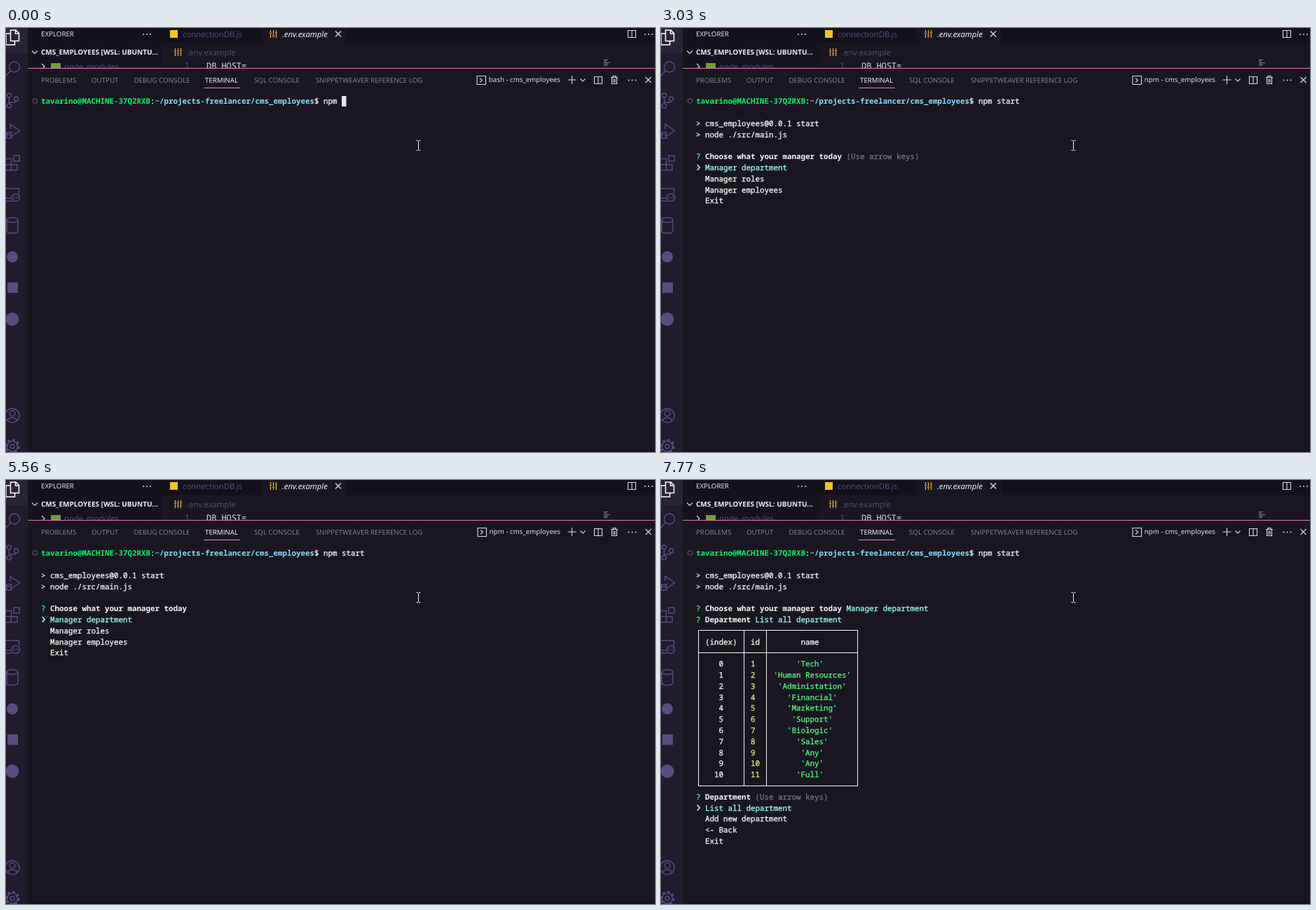
Write an HTML page that moves like this. It is 926 by 605 pixels and loops after 8 s.

```html
<!DOCTYPE html>
<html lang="en">
<head>
<meta charset="utf-8">
<title>Terminal session</title>
<style>
  html, body { margin: 0; width: 100%; height: 100%; overflow: hidden; background: #191622; }
  svg { display: block; width: 926px; height: 605px; }
  text { white-space: pre; text-rendering: geometricPrecision; }
  .ui { font-family: "Open Sans", "Noto Sans", sans-serif; font-size: 9.75px; fill: #efedf5; }
  .file { font-size: 11.35px; }
  .folder { font-size: 10px; font-weight: 700; }
  .mono { font-family: "Noto Sans Mono", "DejaVu Sans Mono", monospace; font-size: 10.833px; }
  .code { font-size: 11.9px; }
  .dim { fill: #5a4b81; }
  .tab { fill: #8a8594; }
  .line { fill: none; stroke: #5a4b81; stroke-width: 1.5; }
  .tool { fill: none; stroke: #dedbe6; stroke-width: 1.1; }
  .gold { fill: none; stroke: #f0b429; stroke-width: 1.3; }
</style>
</head>
<body>
<svg viewBox="0 0 926 605">
  <defs>
    <path id="sliders" d="M1.5 0V3M1.5 6V11M5.5 0V6M5.5 9V11M9.5 0V2M9.5 5V11M0 4.5H3M4 7.5H7M8 3.5H11"/>
    <path id="split" d="M.5 .5H11.5V10.5H.5ZM6 .5V10.5"/>
    <g id="dots" fill="#dedbe6"><circle cx="1" r="1"/><circle cx="6" r="1"/><circle cx="11" r="1"/></g>
    <path id="cross" d="M0 0L8 8M8 0L0 8"/>
  </defs>

  <!-- Explorer and editor -->
  <rect width="926" height="605" fill="#191622"/>
  <rect x="31" width="192" height="57" fill="#15121e"/>
  <rect x="223" width="703" height="21" fill="#13111b"/>
  <rect x="365" width="121" height="21" fill="#191622"/>
  <g class="ui">
    <text x="50" y="12">EXPLORER</text>
    <text x="50" y="38" class="folder">CMS_EMPLOYEES [WSL: UBUNTU...</text>
    <g class="file">
      <text x="83" y="59" class="dim">node_modules</text>
      <text x="252" y="12.7" class="dim">connectionDB.js</text>
      <text x="394" y="12.7" font-style="italic" fill="#fff">.env.example</text>
      <text x="258" y="39" class="dim">.env.example</text>
    </g>
  </g>
  <g class="mono code">
    <text x="255" y="58" class="dim">1</text>
    <text x="286" y="58" fill="#e1e1e6">DB_HOST=</text>
  </g>
  <rect x="234" y="3" width="11" height="11" fill="#f5c322"/>
  <rect x="64" y="50" width="14" height="9" rx="1" fill="#6ba03c"/>
  <use href="#sliders" x="376" y="3" class="gold"/>
  <use href="#sliders" x="240" y="29" class="gold"/>
  <use href="#dots" x="195" y="9"/>
  <use href="#dots" x="911" y="9"/>
  <g class="tool">
    <path d="M37 32.5L41 36.5L45 32.5M51 51L55 55L51 59"/>
    <use href="#split" x="887" y="3"/>
    <use href="#cross" x="470" y="4.5" stroke-width="1.3"/>
  </g>
  <path d="M853 45.5H859M853 47.5H857M853 49.5H862M853 51.5H859M853 53.5H858" stroke="#85818f" fill="none"/>

  <!-- Panel -->
  <rect x="31" y="57" width="895" height="548" fill="#191622"/>
  <rect x="31" y="57" width="895" height="1" fill="#f075be"/>
  <rect x="31" y="603" width="895" height="2" fill="#13111b"/>
  <rect x="282" y="85" width="52" height="1" fill="#ff79c6"/>
  <g class="ui">
    <g class="tab">
      <text x="50" y="78">PROBLEMS</text>
      <text x="122" y="78">OUTPUT</text>
      <text x="182.5" y="78">DEBUG CONSOLE</text>
      <text x="354" y="78">SQL CONSOLE</text>
      <text x="442" y="78">SNIPPETWEAVER REFERENCE LOG</text>
    </g>
    <text x="284" y="78" fill="#fff">TERMINAL</text>
    <text id="shell" x="791" y="77.4" text-anchor="end"></text>
  </g>
  <g class="tool">
    <path id="shellIcon" d="M672 68.5H684.5V80.5H672ZM676 71.5L679.5 74.5L676 77.5"/>
    <path d="M801.5 74H813.5M807.5 68V80M819.5 72.5L823 76L826.5 72.5"/>
    <use href="#split" x="839" y="69"/>
    <path d="M863 70.5H873M866 70V68.5H870V70M864.5 71V79.5H871.5V71M867 72.5V78M869 72.5V78"/>
    <use href="#cross" x="912.5" y="70"/>
  </g>
  <use href="#dots" x="887.5" y="74.5"/>
  <circle cx="41.5" cy="104" r="3.2" fill="none" stroke="#55515e" stroke-width="1.3"/>

  <!-- Activity bar -->
  <rect width="31" height="605" fill="#201b2d"/>
  <rect width="31" height="36" fill="#292338"/>
  <path d="M6.5 3H14L18.5 7.5V18.5H6.5ZM13.5 3V8H18.5M6.5 8H0V24H12.5V18.5" fill="none" stroke="#fff" stroke-width="1.5"/>
  <g class="line">
    <circle cx="12" cy="55.5" r="7.5"/><path d="M6.5 61L-1 69"/>
    <circle cx="4.5" cy="96" r="3"/><circle cx="14.5" cy="101" r="3"/><circle cx="4.5" cy="111" r="3"/>
    <path d="M4.5 99V108M14.5 104C14.5 107 10 106 4.5 106"/>
    <path d="M6 144V137.5L19.5 146.5L9.5 153.5"/>
    <ellipse cx="4" cy="153" rx="3.5" ry="4.5"/>
    <path d="M.5 152H7.5M-1 149L1 150M7 150L9 148M7.5 154H10M7 156L9 158M1 156L-1 158"/>
    <path d="M0 186.5H7.5V203H0M0 195H16V203H7.5M11 182H19V190H11Z"/>
    <path d="M0 229H18.5V236M0 243H9M0 247H9"/><circle cx="14" cy="242" r="5.5"/>
    <path d="M11 240L13 242L11 244M17 240L15 242L17 244" stroke-width="1"/>
    <ellipse cx="9" cy="274" rx="8" ry="3.5"/><path d="M1 274V289C1 294 17 294 17 289V274"/>
    <circle cx="9" cy="553" r="10"/><circle cx="9" cy="550" r="4"/><path d="M2.5 560C4 554.5 14 554.5 15.5 560"/>
    <circle cx="9" cy="597" r="3"/><circle cx="9" cy="597" r="7.5"/>
    <circle cx="9" cy="597" r="9.3" stroke-width="2.5" stroke-dasharray="3.5 3.8"/>
  </g>
  <g class="dim">
    <circle cx="9" cy="326.5" r="8"/>
    <rect x="2" y="363" width="15" height="15"/>
    <circle cx="9" cy="415.5" r="9.5"/>
  </g>

  <g id="term" class="mono"></g>
  <path d="M585.5 160.5H587.5L588.5 161.5L589.5 160.5H591.5M588.5 161V173.5M585.5 174.5H587.5L588.5 173.5L589.5 174.5H591.5" fill="none" stroke="#f4f4f4"/>
</svg>
<script>
const LOOP = 8000, COL = 6.5, ROW = 15.8, LEFT = 50;
const FG = '#f8f8f5', GREEN = '#50fa7b', CYAN = '#9ffbf5', YELLOW = '#f0e684', GREY = '#77757d';
const term = document.getElementById('term');
const shell = document.getElementById('shell');
const shellIcon = document.getElementById('shellIcon');

const MAIN = ['Manager department', 'Manager roles', 'Manager employees', 'Exit'];
const DEPT = ['List all department', 'Add new department', '<- Back', 'Exit'];
const NAMES = ['Tech', 'Human Resources', 'Administation', 'Financial', 'Marketing',
  'Support', 'Biologic', 'Sales', 'Any', 'Any', 'Full'];

const xAt = col => LEFT + col * COL;
const midY = row => 104.2 + row * ROW;

function add(tag, attrs, str = '') {
  const el = document.createElementNS('http://www.w3.org/2000/svg', tag);
  for (const key in attrs) el.setAttribute(key, attrs[key]);
  el.textContent = str;
  term.append(el);
}

// Regular text gets a hairline outline for a slightly heavier weight.
function put(col, row, str, fill = FG, bold = false) {
  add('text', {
    x: xAt(col), y: midY(row) + 4, fill,
    'font-weight': bold ? 700 : 400, stroke: fill, 'stroke-width': bold ? 0 : .3
  }, str);
}

function cursor(col, row) {
  add('rect', { x: xAt(col), y: Math.round(midY(row) - 7.4), width: COL, height: 15, fill: '#e4e3e8' });
}

function stroke(d, color, width) {
  add('path', { d, fill: 'none', stroke: color, 'stroke-width': width });
}

function command(typed) {
  put(0, 0, 'tavarino@MACHINE-37Q2RXB', '#00f769', true);
  put(24, 0, ':');
  put(25, 0, '~/projects-freelancer/cms_employees', '#85e0fa', true);
  put(60, 0, '$ npm ' + typed);
}

function banner() {
  command('start');
  put(0, 2, '> cms_employees@0.0.1 start');
  put(0, 3, '> node ./src/main.js');
}

function question(row, title, tail = '', color = CYAN) {
  put(0, row, '?', GREEN);
  put(2, row, title, FG, true);
  put(3 + title.length, row, tail, color);
}

function menu(row, title, items, picked, hint) {
  question(row, title, hint ? '(Use arrow keys)' : '', GREY);
  items.forEach((item, i) => put(2, row + 1 + i, item, i === picked ? CYAN : FG));
  const y = midY(row + 1 + picked);
  stroke(`M51.7 ${y - 4}L55.2 ${y}L51.7 ${y + 4}`, CYAN, 1.6);
}

function table(top) {
  const x = [0, 10, 15, 35].map(c => Math.floor(xAt(c + .5)) + .5);
  const y = [top, top + 2, top + 3 + NAMES.length].map(r => Math.floor(midY(r)) + .5);
  stroke(x.map(v => `M${v} ${y[0]}V${y[2]}`).join('') +
    y.map(v => `M${x[0]} ${v}H${x[3]}`).join(''), FG, 1);
  const cell = (start, width, row, str, color) =>
    put(start + Math.floor((width - str.length) / 2), row, str, color);
  cell(1, 9, top + 1, '(index)');
  cell(11, 4, top + 1, 'id');
  cell(16, 19, top + 1, 'name');
  NAMES.forEach((name, i) => {
    const row = top + 3 + i;
    cell(1, 9, row, `${i}`);
    cell(11, 4, row, `${i + 1}`, YELLOW);
    cell(16, 19, row, `'${name}'`, GREEN);
  });
}

const typing = n => () => { command('start'.slice(0, n)); cursor(66 + n, 0); };
const entered = () => { command('start'); cursor(0, 1); };
const started = () => { banner(); cursor(0, 5); };
const mainMenu = (picked, hint) => () => {
  banner();
  menu(5, 'Choose what your manager today', MAIN, picked, hint);
};
const chosen = () => {
  banner();
  question(5, 'Choose what your manager today', MAIN[0]);
};
const deptMenu = (picked, hint) => () => { chosen(); menu(6, 'Department', DEPT, picked, hint); };
const answered = () => { chosen(); question(6, 'Department', DEPT[0]); };
const querying = () => { answered(); cursor(0, 7); };
const listed = () => { answered(); table(7); menu(22, 'Department', DEPT, 0, true); };

const steps = [
  [0, typing(0)], [280, typing(1)], [530, typing(2)], [680, typing(3)],
  [960, typing(4)], [1110, typing(5)], [1670, entered], [1950, entered],
  [2350, started], [3030, mainMenu(0, true)], [4180, mainMenu(1)], [4330, mainMenu(2)],
  [4760, banner], [4880, mainMenu(3)], [5130, mainMenu(2)], [5280, mainMenu(1)],
  [5560, mainMenu(0)], [5960, deptMenu(0, true)], [6490, deptMenu(1)], [6640, chosen],
  [6760, deptMenu(2)], [7070, deptMenu(1)], [7220, deptMenu(0)], [7650, querying], [7770, listed]
];

let shown = -1;
function draw(now) {
  const t = now % LOOP;
  const index = steps.findLastIndex(([start]) => t >= start);
  if (index === shown) return;
  shown = index;
  term.replaceChildren();
  steps[index][1]();
  const running = t >= 1950;
  shell.textContent = `${running ? 'npm' : 'bash'} - cms_employees`;
  shellIcon.setAttribute('transform', `translate(${running ? 1 : 0})`);
}

const origin = performance.now();
function tick() {
  draw(performance.now() - origin);
  requestAnimationFrame(tick);
}
tick();
</script>
</body>
</html>
```
